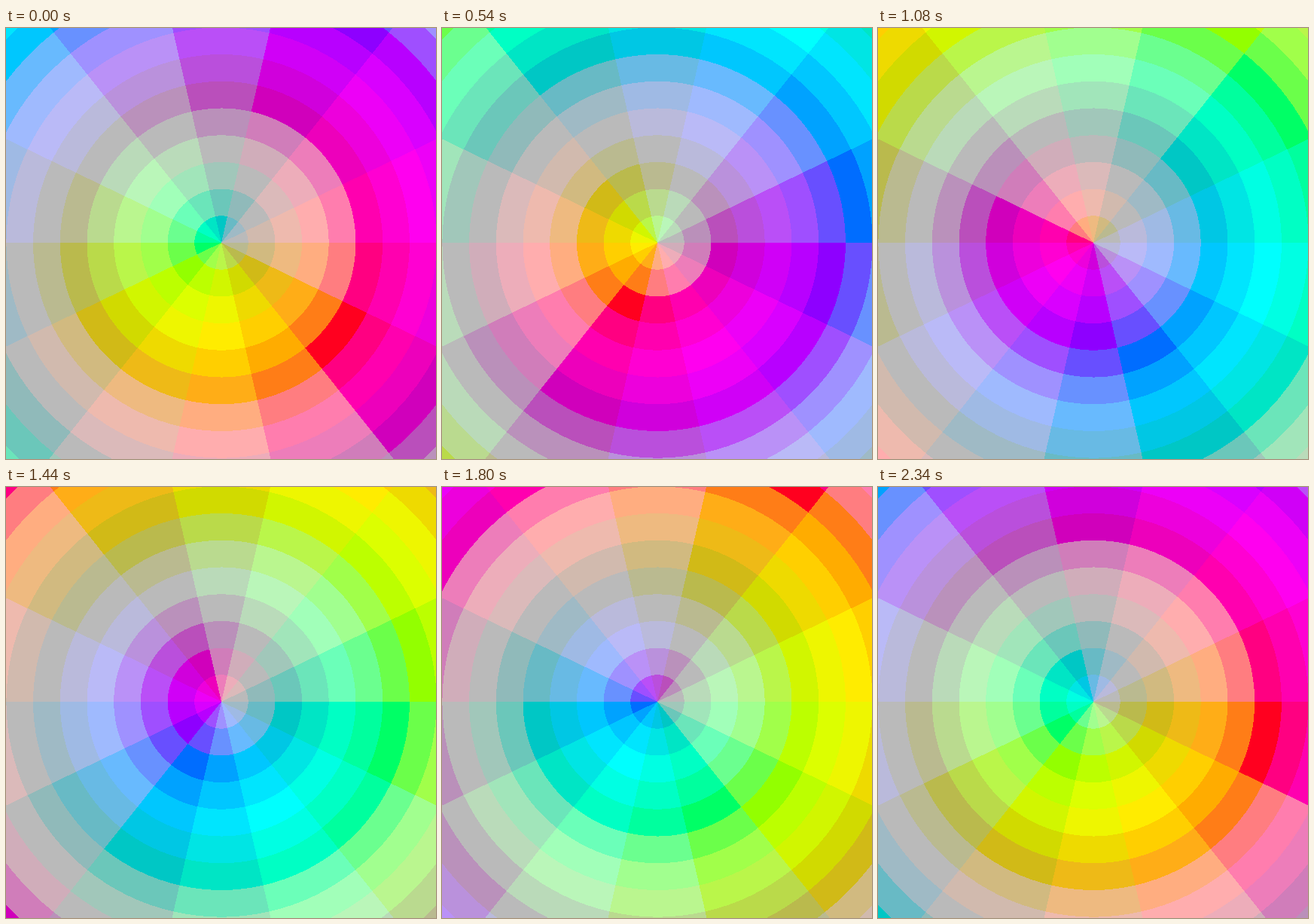
Animation of 571 by 572 pixels, one loop 2520 ms. Source, as an HTML page:

```html
<!DOCTYPE html>
<html lang="en">
<head>
<meta charset="utf-8">
<title>Colour wheel</title>
<style>
  html, body { margin: 0; width: 100%; height: 100%; overflow: hidden; }
  svg { display: block; width: 100vw; height: 100vh; }
</style>
</head>
<body>
<svg id="stage" viewBox="0 0 571 572" preserveAspectRatio="none" shape-rendering="crispEdges"></svg>
<script>
const N = 14, RINGS = 12, STEP_MS = 180;
const CX = 286, CY = 285, RING = 35.7;
const HUE_SHIFT = -0.01;
const stage = document.getElementById('stage');
const mod = (a, n) => ((a % n) + n) % n;

// Fully saturated hue in linear light; i counts fourteenths of the wheel.
function hue(i) {
  const h = mod(i * 6 / N + HUE_SHIFT, 6);
  return [0, 2, 4].map(c => {
    const d = Math.abs(mod(h - c + 3, 6) - 3);
    return Math.min(1, Math.max(0, 2 - d));
  });
}

// Even mix of two hues, gamma encoded for display.
function blend(a, b) {
  const q = hue(b);
  const rgb = hue(a).map((p, i) => Math.round(255 * ((p + q[i]) / 2) ** (1 / 2.2)));
  return `rgb(${rgb})`;
}

function point(radius, sector) {
  const a = sector * 2 * Math.PI / N;
  return `${(CX + radius * Math.cos(a)).toFixed(3)} ${(CY + radius * Math.sin(a)).toFixed(3)}`;
}

// Larger wedges go first, so each smaller ring covers their inner part.
const cells = [];
for (let ring = RINGS - 1; ring >= 0; ring--) {
  const radius = (ring + 1) * RING;
  for (let sector = 0; sector < N; sector++) {
    const el = document.createElementNS('http://www.w3.org/2000/svg', 'path');
    el.setAttribute('d', `M${CX} ${CY}L${point(radius, sector)}A${radius} ${radius} 0 0 1 ${point(radius, sector + 1)}Z`);
    stage.append(el);
    cells.push({ el, ring, sector });
  }
}

// Ring hues flow inward while sector hues turn clockwise.
function draw(step) {
  for (const { el, ring, sector } of cells) {
    el.setAttribute('fill', blend(5 - ring - step, sector - step - 1));
  }
}

let shown = -1;
function tick() {
  const step = Math.floor(performance.now() / STEP_MS) % N;
  if (step !== shown) draw(shown = step);
  requestAnimationFrame(tick);
}
tick();
</script>
</body>
</html>
```
